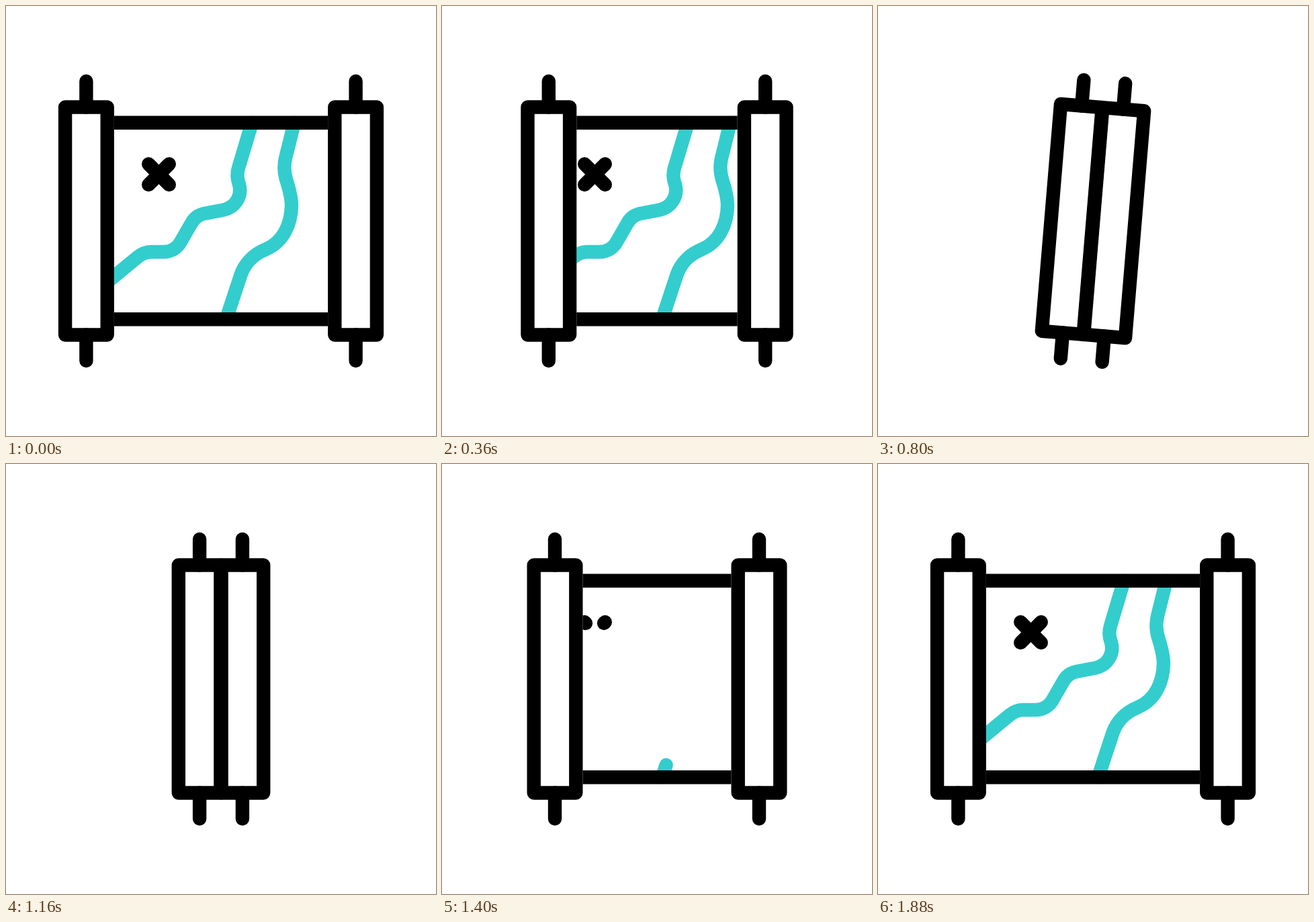
Animation, 640 px wide and 640 px high, one loop 2400 ms. Source, as an HTML page:

```html
<!DOCTYPE html>
<html lang="en">
<head>
<meta charset="utf-8">
<title>Map scroll</title>
<style>
  html, body { margin: 0; width: 100%; height: 100%; overflow: hidden; background: #fff; }
  svg { display: block; width: 100%; height: 100%; }
  .ink { fill: none; stroke: #000; stroke-width: 20.4; stroke-linecap: round; stroke-linejoin: round; }
  .river { stroke: #33cdcd; }
</style>
</head>
<body>
<svg viewBox="0 0 640 640">
  <defs>
    <clipPath id="opening"><rect id="window" y="100" height="440"/></clipPath>
    <g id="roller">
      <rect x="-31.3" y="150.5" width="62.6" height="339"/>
      <path d="M0 112V150.5M0 489.5V528"/>
    </g>
  </defs>
  <g id="scroll" class="ink">
    <g clip-path="url(#opening)">
      <path class="river drawn" pathLength="1" d="M150.6 411L196 373.6C202 368.6 209 366 217 366H234C245 366 255 360.5 260 351L275.5 324C280 315.5 287 310.7 295 309L324 303.4C341 300 352 283 347 265.5L345.8 261.5C344 255 344 248 346 241L366 174"/>
      <path class="river drawn" pathLength="1" d="M327.7 466L349.5 400C355.5 382.5 369 369.5 386 362.5C413 351.5 424.5 324 425 297C425 287 422.5 277 420 268L417 258C414 248 413.5 237 416 226.5L429 174"/>
      <path class="drawn" pathLength="1" d="M212.2 235.3L242.8 266"/>
      <path class="drawn" pathLength="1" d="M242.8 235.3L212.2 266"/>
      <path d="M100 173.8H540M100 466.2H540"/>
    </g>
    <use id="left" href="#roller"/>
    <use id="right" href="#roller"/>
  </g>
</svg>
<script>
const LOOP = 2400, STEP = 40;
const OPEN = 200.6, CLOSED = 31, ROLLER_EDGE = 41.5;
const byId = id => document.getElementById(id);
const [scroll, left, right, win] = ['scroll', 'left', 'right', 'window'].map(byId);
const drawn = document.querySelectorAll('.drawn');

const clamp = x => Math.min(1, Math.max(0, x));
const smooth = s => s * s * (3 - 2 * s);

// Equivalent to cubic-bezier(.62, 0, .38, 1)
function ease(x) {
  let lo = 0, hi = 1;
  for (let i = 0; i < 24; i++) {
    const s = (lo + hi) / 2, r = 1 - s;
    if (1.86 * s * r * r + 1.14 * s * s * r + s ** 3 < x) lo = s; else hi = s;
  }
  return x <= 0 ? 0 : x >= 1 ? 1 : smooth(lo);
}
const progress = (t, start, length) => ease(clamp((t - start) / length));

// Piecewise tilt in degrees: [time, angle]
const TILT = [[667, 0], [820, 5], [973, -5], [1125, 0]];
function tilt(t) {
  for (let i = 1; i < TILT.length; i++) {
    const [t0, a0] = TILT[i - 1], [t1, a1] = TILT[i];
    if (t >= t0 && t < t1) return a0 + (a1 - a0) * smooth((t - t0) / (t1 - t0));
  }
  return 0;
}

function render(t) {
  const shut = progress(t, 169, 500) - progress(t, 1125, 467);
  const reach = OPEN + (CLOSED - OPEN) * shut;
  const half = Math.max(0, reach - ROLLER_EDGE);
  const trace = t < 700 ? 1 : progress(t, 1267, 600);

  left.setAttribute('x', 320 - reach);
  right.setAttribute('x', 320 + reach);
  win.setAttribute('x', 320 - half);
  win.setAttribute('width', 2 * half);
  scroll.setAttribute('transform', `rotate(${tilt(t)} 320 320)`);
  for (const path of drawn) {
    path.style.strokeDasharray = trace < 1 ? `${trace} 2` : 'none';
    path.style.visibility = trace > 0 ? 'visible' : 'hidden';
  }
}

const begin = performance.now();
function tick() {
  // The small lead keeps each step from landing one display refresh late
  const t = (performance.now() - begin + 6) % LOOP;
  render(Math.floor(t / STEP) * STEP);
  requestAnimationFrame(tick);
}
tick();
</script>
</body>
</html>
```
